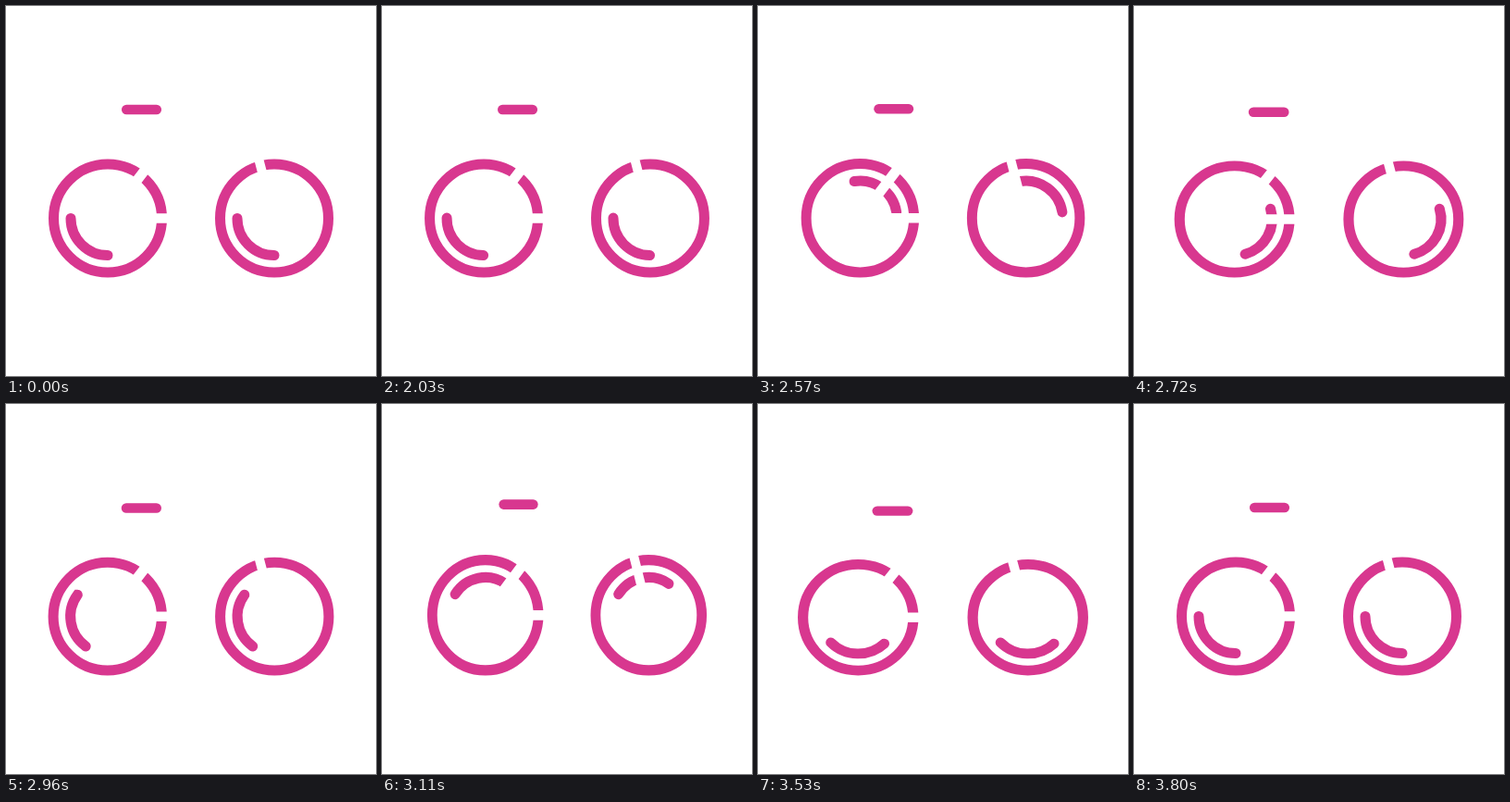
These frames come from a looping animation (400 px wide and 400 px high, 3890 ms). An HTML page with a canvas:

```html
<!DOCTYPE html>
<html lang="en">
<head>
<meta charset="utf-8">
<title>Bicycle</title>
<style>
  html, body { margin: 0; width: 100%; height: 100%; overflow: hidden; background: #fff; }
  canvas { display: block; width: 400px; height: 400px; }
</style>
</head>
<body>
<canvas id="stage" width="400" height="400"></canvas>
<script>
const ctx = document.getElementById('stage').getContext('2d');
const PINK = '#d8378f';
const WHITE = '#fff';
const LOOP = 3890;
const START = 2000;
const STEP = 30;
const STEPS = 60;
const HUB_Y = 229.5;
const GROUND = 293.5;

// Vertical stretch of the bike: [step, amount]
const STRETCH = [[0, 0], [13, 0.02], [27, -0.02], [38, 0.02], [52, -0.02], [60, 0]];

const smooth = u => u * u * (3 - 2 * u);

function stretchAt(n) {
  for (let i = 1; i < STRETCH.length; i++) {
    const [a, from] = STRETCH[i - 1];
    const [b, to] = STRETCH[i];
    if (n <= b) return from + (to - from) * smooth((n - a) / (b - a));
  }
  return 0;
}

function stroke(color, width, cap) {
  ctx.strokeStyle = color;
  ctx.lineWidth = width;
  ctx.lineCap = cap;
  ctx.stroke();
}

function line(x1, y1, x2, y2, color, width) {
  ctx.beginPath();
  ctx.moveTo(x1, y1);
  ctx.lineTo(x2, y2);
  stroke(color, width, 'round');
}

function wheel(x, turn) {
  ctx.beginPath();
  ctx.arc(x, HUB_Y, 58.5, 0, Math.PI * 2);
  stroke(PINK, 11, 'butt');
  ctx.beginPath();
  ctx.arc(x, HUB_Y, 40, turn + Math.PI / 2, turn + Math.PI);
  stroke(PINK, 11, 'round');
}

function draw(time) {
  const n = Math.max(0, Math.min(STEPS, Math.floor((time - START) / STEP)));
  const turn = smooth(n / STEPS) * Math.PI * 4;
  const s = stretchAt(n);

  ctx.setTransform(1, 0, 0, 1, 0, 0);
  ctx.fillStyle = WHITE;
  ctx.fillRect(0, 0, 400, 400);

  // Squash and stretch from the ground up
  ctx.translate(200, GROUND);
  ctx.scale(1 - s, 1 + s);
  ctx.translate(-200, -GROUND);

  wheel(110, turn);
  wheel(290, turn);

  // Frame tubes crossing the wheels
  line(110, HUB_Y, 200, HUB_Y, WHITE, 10.5);
  line(110, HUB_Y, 162, 162, WHITE, 11);
  line(290, HUB_Y, 271, 157, WHITE, 10);

  // Saddle
  line(130.2, 112, 162.8, 112, PINK, 10.5);
}

const begin = performance.now();

function tick() {
  draw((performance.now() - begin) % LOOP);
  requestAnimationFrame(tick);
}

tick();
</script>
</body>
</html>
```
